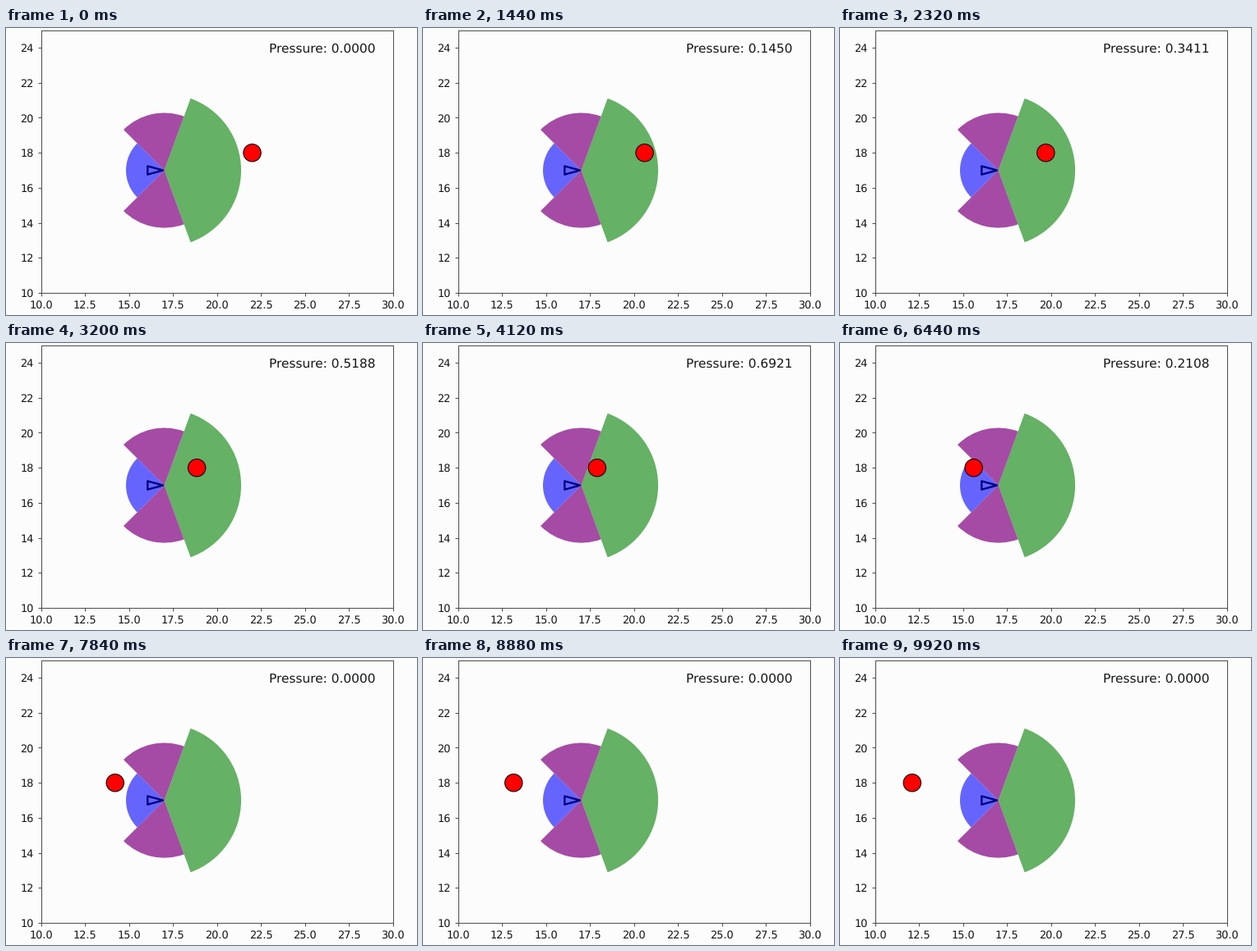
These frames come from a looping animation (500x350 px, 9960 ms). A matplotlib script:

```python
import math

import matplotlib.pyplot as plt
import numpy as np
from matplotlib.animation import FuncAnimation
from matplotlib.patches import Circle, Polygon, Wedge

W, H, DPI = 500, 350, 100
SCALE = 0.925           # shrinks the default font and line sizes
SLOTS, SLOT_MS = 249, 40
AGENT = (17, 17)
FRONT, SIDE, REAR = 4.37, 3.28, 2.18
FRONT_ANGLE, SIDE_ANGLE = 70, 135
BACKGROUND, FRAME, INK = "#fcfcfc", "#505050", "#161616"

plt.rcParams["text.hinting"] = "no_hinting"

fig = plt.figure(figsize=(W / DPI, H / DPI), dpi=DPI, facecolor=BACKGROUND)
ax = fig.add_axes([42.9 / W, 26.9 / H, 427.7 / W, 320.4 / H], facecolor=BACKGROUND)
ax.set(xlim=(10, 30), ylim=(10, 25))
ax.set_xticks(np.arange(10, 30.1, 2.5))
ax.set_yticks(range(10, 25, 2))
ax.xaxis.set_major_formatter("{x:.1f}")
ax.tick_params(labelsize=10 * SCALE, length=3.5 * SCALE, pad=3.5 * SCALE,
               width=0.8 * SCALE, color=FRAME, labelcolor=INK)
for spine in ax.spines.values():
    spine.set(linewidth=0.8 * SCALE, edgecolor=FRAME)


def add_zone(radius, start, end, color, alpha):
    ax.add_patch(Wedge(AGENT, radius, start, end, facecolor=color,
                       alpha=alpha, linewidth=0))


add_zone(REAR, SIDE_ANGLE, 360 - SIDE_ANGLE, "blue", 0.6)
add_zone(SIDE, FRONT_ANGLE, SIDE_ANGLE, "purple", 0.7)
add_zone(SIDE, 360 - SIDE_ANGLE, 360 - FRONT_ANGLE, "purple", 0.7)
add_zone(FRONT, -FRONT_ANGLE, FRONT_ANGLE, "green", 0.6)

ax.add_patch(Polygon([(16.05, 17.24), (16.05, 16.76), (16.93, 17)], fill=False,
                     edgecolor="navy", linewidth=1.7, joinstyle="round"))
ball = ax.add_patch(Circle((22, 18), 0.5, facecolor="red", edgecolor="black",
                           linewidth=0.75, zorder=4))
label = ax.text(0.95, 0.95, "", transform=ax.transAxes, ha="right", va="top",
                fontsize=12 * SCALE, color=INK, zorder=5)


def pressure(x, y):
    dx, dy = x - AGENT[0], y - AGENT[1]
    angle = abs(math.degrees(math.atan2(dy, dx)))
    if angle <= FRONT_ANGLE:
        radius = FRONT
    elif angle <= SIDE_ANGLE:
        radius = SIDE
    else:
        radius = REAR
    return max(0.0, 1 - math.hypot(dx, dy) / radius)


def update(slot):
    # 20 simulation steps per second, shown at 25 pictures per second
    step = max(0, (4 * slot + 4) // 5 - 1)
    x = 22 - 0.05 * step
    ball.center = (x, 18)
    label.set_text(f"Pressure: {pressure(x, 18):.4f}")
    return ball, label


anim = FuncAnimation(fig, update, frames=SLOTS, interval=SLOT_MS, repeat=True)
plt.show()
```
